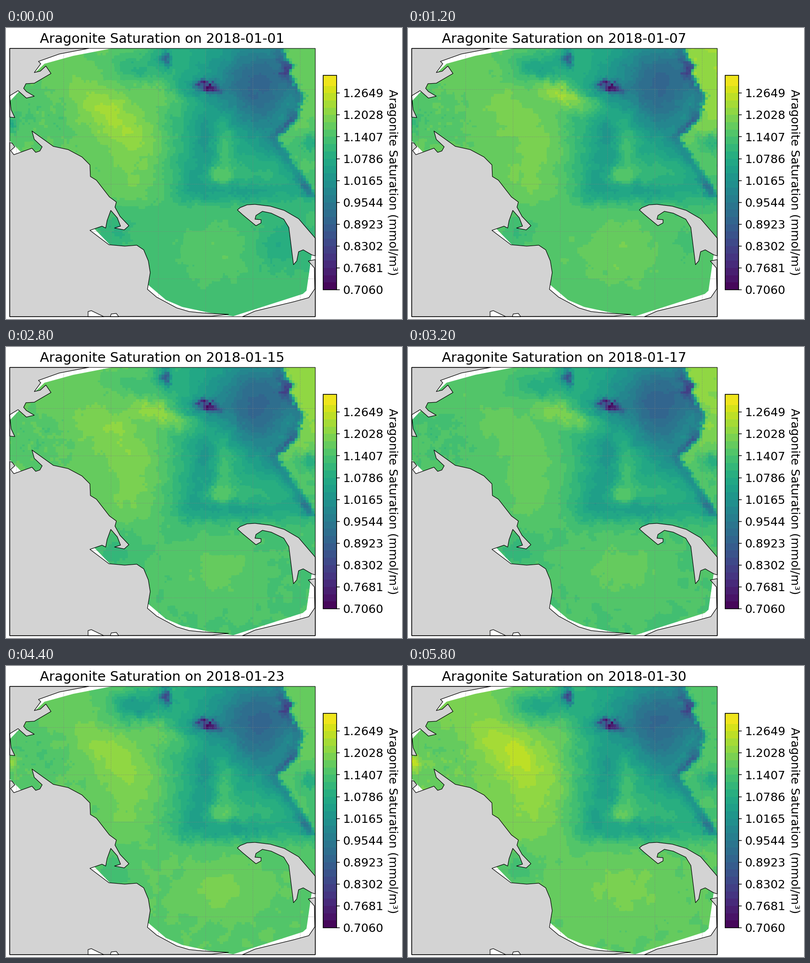
These frames come from a looping animation (854x627 px, 6 s). A matplotlib script:

```python
import numpy as np
import matplotlib.pyplot as plt
from matplotlib.animation import FuncAnimation
from matplotlib.patches import Polygon, Rectangle

W, H, DPI = 854, 627, 100
DAYS, STEP_MS = 30, 200
LEFT, TOP, RIGHT, BOTTOM = 8, 44, 667, 622
CELL = 6
PX = 72 / DPI

V_MIN, V_MAX, V_STEP = 0.706, 1.3155, 0.0207
LEVELS = np.append(V_MIN + V_STEP * np.arange(29), V_MAX)
MIDS = (LEVELS[:-1] + LEVELS[1:]) / 2
COLORS = plt.get_cmap("viridis")((MIDS - V_MIN) / (V_MAX - V_MIN))

# Edge of the sea data and the coastlines, as key points.
DOMAIN = [
    (228, 44), (145, 60), (83, 77), (62, 97), (28, 137), (8, 158), (8, 243),
    (33, 268), (190, 432), (224, 467), (305, 552), (345, 586), (380, 601),
    (436, 613), (490, 621), (640, 573), (648, 566), (659, 490), (667, 480),
    (667, 44)]
NORTH_LAND = [
    (8, 44), (178, 44), (115, 56), (70, 72), (75, 77), (61, 96), (74, 93),
    (86, 82), (97, 98), (61, 119), (43, 120), (38, 130), (44, 137), (61, 147),
    (44, 151), (26, 135), (8, 146), (11, 176), (19, 193), (8, 192)]
WEST_LAND = [
    (8, 247), (13, 248), (19, 256), (10, 264), (17, 273), (56, 259), (64, 268),
    (73, 265), (78, 256), (61, 240), (56, 222), (102, 255), (134, 262),
    (164, 278), (181, 295), (182, 320), (195, 328), (223, 364), (238, 375),
    (235, 386), (246, 406), (265, 426), (255, 435), (234, 431), (247, 427),
    (240, 409), (226, 393), (218, 415), (215, 431), (207, 427), (181, 436),
    (222, 467), (256, 470), (282, 468), (297, 478), (307, 502), (311, 527),
    (305, 563), (325, 580), (368, 603), (395, 611), (425, 614), (480, 617),
    (443, 621), (8, 622)]
SOUTH_LAND = [
    (510, 622), (537, 610), (620, 590), (653, 581), (666, 562), (665, 517),
    (652, 502), (667, 499), (667, 622)]
HOOK = [
    (667, 453), (631, 411), (600, 393), (570, 384), (537, 380), (520, 381),
    (505, 387), (499, 392), (510, 402), (539, 426), (550, 420), (550, 413),
    (537, 412), (539, 404), (553, 395), (572, 399), (599, 412), (610, 430),
    (620, 510), (627, 502), (631, 482), (641, 478), (660, 489), (667, 491)]
PONDS = [[(177, 622), (177, 611), (184, 609), (211, 622)],
         [(225, 622), (227, 616), (238, 615), (243, 622)]]
FRONT = [(600, 44), (606, 70), (622, 82), (612, 98), (642, 145), (630, 195),
         (586, 238), (628, 300), (664, 352)]

gx = np.arange(LEFT - CELL, RIGHT + 2 * CELL, CELL)
gy = np.arange(TOP - CELL, BOTTOM + 2 * CELL, CELL)
GRID = np.meshgrid(gx.astype(float), gy.astype(float))
# Each model cell is a small flat square.
PLOT_X = np.repeat(gx, 2) + np.tile([-2, 2], gx.size)
PLOT_Y = np.repeat(gy, 2) + np.tile([-2, 2], gy.size)


def noise(seed, passes):
    n = np.random.default_rng(seed).normal(size=GRID[0].shape)
    for _ in range(passes):
        n = (n + sum(np.roll(n, s, a) for s in (1, -1) for a in (0, 1))) / 5
    return n / n.std()


# Warped coordinates make every contour ragged.
X = GRID[0] + 3.5 * noise(1, 1)
Y = GRID[1] + 3.5 * noise(2, 1)


def blob(x, y, sx, sy, angle=0):
    c, s = np.cos(np.radians(angle)), np.sin(np.radians(angle))
    dx, dy = X - x, Y - y
    return np.exp(-((c * dx + s * dy) / sx) ** 2 / 2
                  - ((c * dy - s * dx) / sy) ** 2 / 2)


def ramp(d):
    return 1 / (1 + np.exp(-np.clip(d, -40, 40)))


def keyed(day, *values):
    return np.interp(day, [0, 6, 10, 14, 18, 22, 29], values)


WESTERN = ramp((350 - X) / 16)
NORTHERN = ramp((380 - Y) / 11)
PATCH = blob(228, 190, 72, 33, 38)
TAIL = blob(258, 305, 30, 55)
PLUME = blob(355, 152, 62, 15, 22)
COOL = blob(282, 86, 42, 26)
HARBOUR = blob(12, 208, 13, 11)
CAPE = blob(590, 465, 45, 40)
SOUTH_WARM = blob(462, 480, 60, 42)
CHANNEL = blob(344, 62, 6, 16)

# The open-sea swirl: dark basin and arms, light inner curl.
SWIRL = (-0.18 * blob(553, 110, 72, 62) - 0.06 * blob(575, 225, 100, 36, 45)
         - 0.06 * blob(426, 235, 20, 50) - 0.04 * blob(405, 325, 20, 28)
         - 0.055 * blob(500, 352, 70, 14)
         + 0.045 * blob(470, 255, 14, 50) + 0.05 * blob(458, 318, 24, 13)
         + 0.02 * blob(535, 318, 45, 18))
COAST = -0.02 * blob(60, 190, 60, 45) - 0.035 * blob(235, 440, 25, 25)

# Dark cores in a row, inside a fainter halo.
CORES = 0.04 * blob(415, 128, 35, 13) + 0.05 * blob(335, 60, 16, 18)
for i, depth in enumerate((0.26, 0.2, 0.12)):
    CORES += depth * blob(428 + 15 * i, 123 + 7 * i, 9, 7)

# A sharp front, with a dark trench along its western side.
front = np.interp(GRID[1], *np.array(FRONT).T[::-1]) + 2.5 * noise(3, 0)
offset = GRID[0] - front
EAST_MIX = ramp(offset / 2) * (GRID[1] < 360)
DEPTH = 0.04 + sum(0.11 * np.exp(-((GRID[1] - y) / s) ** 2 / 2)
                   for y, s in ((92, 15), (203, 16), (345, 14)))
TRENCH = DEPTH * np.exp(-((offset + 9) / 10) ** 2 / 2) * (GRID[1] < 365)
NORTH_EAST = ramp((225 - Y) / 25)
EAST_DIP = 0.07 * blob(657, 247, 20, 12)
ROUGH = blob(65, 200, 60, 35)


def field(day):
    west = keyed(day, 1.165, 1.168, 1.16, 1.168, 1.138, 1.165, 1.185)
    south = keyed(day, 1.13, 1.152, 1.132, 1.14, 1.143, 1.158, 1.163)
    east = keyed(day, 1.17, 1.22, 1.22, 1.21, 1.205, 1.17, 1.145)
    patch = keyed(day, 0.065, 0.025, 0.03, 0.035, 0.01, 0.05, 0.065)
    cool = keyed(day, 0.07, 0.11, 0.03, 0.04, 0.09, 0.13, 0.12)
    mid = 1.09 + 0.3 * (west - 1.16)
    t = day / (DAYS - 1)

    north = mid + (west - mid) * WESTERN + SWIRL
    north += PATCH * patch + TAIL * 0.02 - COOL * cool
    north += PLUME * (0.035 + 1.1 * (east - 1.17))
    z = south + (north - south) * NORTHERN + COAST
    z += 0.03 * SOUTH_WARM - 0.05 * np.exp(-day / 5) * CAPE
    z += HARBOUR * (0.2 * t - 0.1) - CORES - CHANNEL * (0.17 + 0.08 * t)
    z -= TRENCH

    right = 1.138 + (east - 1.138) * NORTH_EAST - EAST_DIP
    z += (right - z) * EAST_MIX
    z += 0.003 * noise(100 + day, 3) + 0.01 * ROUGH * noise(200 + day, 1)
    return np.clip(z, V_MIN + 1e-4, V_MAX - 1e-4)


plt.rcParams["font.family"] = "DejaVu Sans"
fig = plt.figure(figsize=((W + .01) / DPI, (H + .01) / DPI), dpi=DPI,
                 facecolor="white")
ax = fig.add_axes([0, 0, 1, 1])
ax.axis("off")
ax.set_autoscale_on(False)
ax.set_xlim(0, W)
ax.set_ylim(H, 0)

domain = ax.add_patch(Polygon(DOMAIN, fc="none", ec="none"))

dashes = dict(color="gray", ls="--", lw=0.55, alpha=0.6, zorder=2)
for x in range(21, RIGHT, 102):
    ax.plot([x + .5] * 2, [BOTTOM, TOP], **dashes)
for y in range(132, BOTTOM, 102):
    ax.plot([LEFT, RIGHT], [y + .5] * 2, **dashes)


def shape(points, color):
    ax.add_patch(Polygon(points, fc=color, ec="black", lw=1.2 * PX, zorder=3,
                         joinstyle="round"))


for land in (NORTH_LAND, WEST_LAND, SOUTH_LAND, HOOK):
    shape(land, "lightgray")
for pond in PONDS:
    shape(pond, "white")
ax.add_patch(Rectangle((LEFT, TOP), RIGHT - LEFT, BOTTOM - TOP, fc="none",
                       ec="black", lw=1.1 * PX, zorder=4, snap=False))

BAR_X, BAR_W, BAR_TOP, BAR_BOTTOM = 683.5, 29, 102, 564


def bar_y(v):
    return BAR_BOTTOM - (v - V_MIN) / (V_MAX - V_MIN) * (BAR_BOTTOM - BAR_TOP)


for lo, hi, c in zip(LEVELS[:-1], LEVELS[1:], COLORS):
    ax.add_patch(Rectangle((BAR_X, bar_y(hi)), BAR_W, bar_y(lo) - bar_y(hi),
                           fc=c, ec="none", antialiased=False))
ax.add_patch(Rectangle((BAR_X, BAR_TOP), BAR_W, BAR_BOTTOM - BAR_TOP,
                       fc="none", ec="black", lw=1.6 * PX, zorder=4))
for i in range(10):
    v = V_MIN + 3 * V_STEP * i
    y = bar_y(v)
    ax.plot([BAR_X + BAR_W, BAR_X + BAR_W + 6], [y, y], color="black",
            lw=1.5 * PX)
    ax.text(726, y + 9, f"{v:.4f}", size=18, va="baseline")
ax.text(826, 333, "Aragonite Saturation (mmol/m³)", size=18, rotation=270,
        rotation_mode="anchor", ha="center", va="baseline")
title = ax.text(337, 32, "", size=21, ha="center", va="baseline")

drawn = []


def update(day):
    while drawn:
        drawn.pop().remove()
    z = field(day).repeat(2, 0).repeat(2, 1)
    sea = ax.contourf(PLOT_X, PLOT_Y, z, levels=LEVELS, colors=COLORS, zorder=1)
    sea.set_clip_path(domain)
    drawn.append(sea)
    ax.set_xlim(0, W)
    ax.set_ylim(H, 0)
    title.set_text(f"Aragonite Saturation on 2018-01-{day + 1:02d}")
    return [sea, title]


anim = FuncAnimation(fig, update, frames=DAYS, interval=STEP_MS,
                     repeat=True, repeat_delay=0, blit=False)
plt.show()
```
